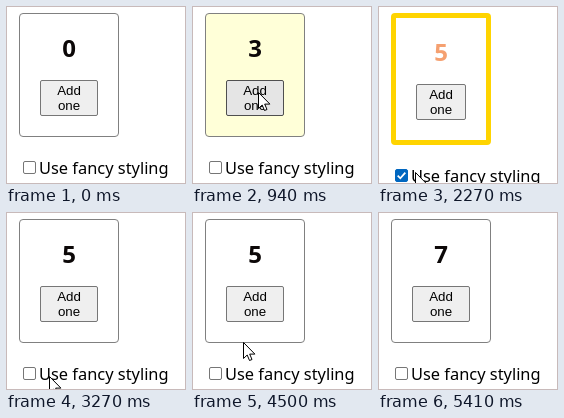
Write an HTML page with a canvas that moves like this. It is 180x178 px and loops after 5770 ms.

```html
<!DOCTYPE html>
<html lang="en">
<head>
<meta charset="utf-8">
<title>Counter with fancy styling</title>
<style>
  html, body { margin: 0; width: 100%; height: 100%; overflow: hidden; background: #fff; }
  canvas { display: block; width: 180px; height: 178px; }
</style>
</head>
<body>
<canvas id="stage"></canvas>
<script>
const W = 180, H = 178, LOOP = 5770;
const canvas = document.getElementById('stage');
const ctx = canvas.getContext('2d');
const dpr = window.devicePixelRatio || 1;
canvas.width = W * dpr;
canvas.height = H * dpr;

// Places the pointer visits; EDGE and BELOW lie outside the stage.
const EDGE = { x: 118, y: H }, BELOW = { x: 31, y: H };
const BUTTON = { x: 66, y: 86 }, LABEL = { x: 38, y: 165 }, CORNER = { x: 31, y: 171 };

const linear = p => p;
const smooth = p => p * p * (3 - 2 * p);
const easeIn = p => p ** 3;
const easeOut = p => 1 - (1 - p) ** 4;
const midpoint = (a, b) => ({ x: (a.x + b.x) / 2, y: (a.y + b.y) / 2 });

// A trip along a quadratic curve; the pointer rests at its end.
const leg = (begin, end, from, to, ease, bend = midpoint(from, to)) =>
  ({ begin, end, from, to, ease, bend });

const legs = [
  leg(100, 600, EDGE, BUTTON, smooth),
  leg(1330, 1890, BUTTON, LABEL, easeOut, { x: 89, y: 125 }),
  leg(2220, 2420, LABEL, CORNER, smooth),
  leg(2620, 2650, CORNER, BELOW, linear),
  leg(3060, 3600, BELOW, LABEL, smooth, { x: 56, y: 150 }),
  leg(4060, 4620, LABEL, BUTTON, easeIn, { x: 51, y: 132 }),
  leg(5140, 5410, BUTTON, EDGE, linear)
];

// Bursts of clicks that slow down a little; each gives release times.
const burst = (first, gap, n) =>
  Array.from({ length: n }, (_, k) => first + gap * k * (1 + 0.16 * k));
const releases = [...burst(740, 75, 5), ...burst(4740, 170, 2)];
const PRESS = 40, HOVER_LAG = 40;
const toggles = [1960, 3200, 3760, 4060];

function pointerAt(t) {
  const l = legs.filter(k => k.begin <= t).pop();
  if (!l) return EDGE;
  const u = l.ease(Math.min(1, (t - l.begin) / (l.end - l.begin)));
  const curve = axis => Math.round(
    (1 - u) ** 2 * l.from[axis] + 2 * u * (1 - u) * l.bend[axis] + u * u * l.to[axis]);
  return { x: curve('x'), y: curve('y') };
}

const inside = (p, x, y, w, h) => p.x >= x && p.x < x + w && p.y >= y && p.y < y + h;

// Rounded box whose border lies inside its bounds.
function box(x, y, w, h, r, line, fill, border) {
  ctx.beginPath();
  ctx.roundRect(x + line / 2, y + line / 2, w - line, h - line, Math.max(r - line / 2, 0));
  ctx.fillStyle = fill;
  ctx.fill();
  ctx.lineWidth = line;
  ctx.strokeStyle = border;
  ctx.stroke();
}

function text(str, x, y, font, color, align = 'center') {
  ctx.font = font;
  ctx.fillStyle = color;
  ctx.textAlign = align;
  ctx.fillText(str, x, y);
}

function drawCard(fancy, hover) {
  const fill = hover ? '#ffffd8' : '#fff';
  if (fancy) box(13, 7, 100, 132, 4, 5, fill, '#ffd400');
  else box(13, 7, 100, 124, 4, 1, fill, '#808080');
}

function drawButton(fancy, hover, pressed) {
  const fill = pressed ? '#f5f5f5' : hover ? '#e5e5e5' : '#efefef';
  const border = pressed ? '#8d8d8d' : hover ? '#4f4f4f' : '#767676';
  const x = fancy ? 38 : 34, y = fancy ? 78 : 74;
  box(x, y, 126 - 2 * x, 36, 2, 1, fill, border);
  const font = '13.333px "Liberation Sans", Arial, sans-serif';
  text('Add', 63, y + 15, font, '#000');
  text('one', 63, y + 30, font, '#000');
}

function drawCheckbox(checked) {
  const y = checked ? 163 : 155;
  if (checked) {
    box(17, y, 13, 13, 2, 1, '#0067c0', '#0067c0');
    ctx.beginPath();
    ctx.moveTo(19.7, y + 6.7);
    ctx.lineTo(22.3, y + 9.3);
    ctx.lineTo(27.3, y + 3.7);
    ctx.lineWidth = 1.8;
    ctx.strokeStyle = '#fff';
    ctx.stroke();
  } else {
    box(17, y, 13, 13, 2, 1, '#fff', '#767676');
  }
  text('Use fancy styling', 33, y + 13, '16.4px "Noto Sans", sans-serif', '#000', 'left');
}

const arrow = new Path2D('M0 0V16L3.7 12.5L6 18L8.5 17L6.2 11.6H11.4Z');

function drawPointer(p) {
  ctx.save();
  ctx.translate(p.x + 0.5, p.y + 0.5);
  ctx.fillStyle = '#fff';
  ctx.fill(arrow);
  ctx.lineWidth = 1;
  ctx.strokeStyle = '#000';
  ctx.stroke(arrow);
  ctx.restore();
}

function draw(t) {
  const pointer = pointerAt(t);
  const fancy = toggles.filter(k => k <= t).length % 2 === 1;
  const count = releases.filter(r => r <= t).length;
  const pressed = releases.some(r => t >= r - PRESS && t < r);
  const hover = inside(pointerAt(t - HOVER_LAG), 13, 7, 100, fancy ? 132 : 124);

  ctx.setTransform(dpr, 0, 0, dpr, 0, 0);
  ctx.fillStyle = '#fff';
  ctx.fillRect(0, 0, W, H);

  drawCard(fancy, hover);
  text(String(count), 63, fancy ? 55 : 51, 'bold 24px "Noto Sans", sans-serif',
       fancy ? '#f5a070' : '#0c0808');
  drawButton(fancy, inside(pointer, 34, 74, 58, 36), pressed);
  drawCheckbox(fancy);
  drawPointer(pointer);

  ctx.lineWidth = 1;
  ctx.strokeStyle = '#c8baba';
  ctx.strokeRect(0.5, 0.5, W - 1, H - 1);
}

const start = performance.now();
function tick() {
  draw((performance.now() - start) % LOOP);
  requestAnimationFrame(tick);
}
tick();
</script>
</body>
</html>
```
